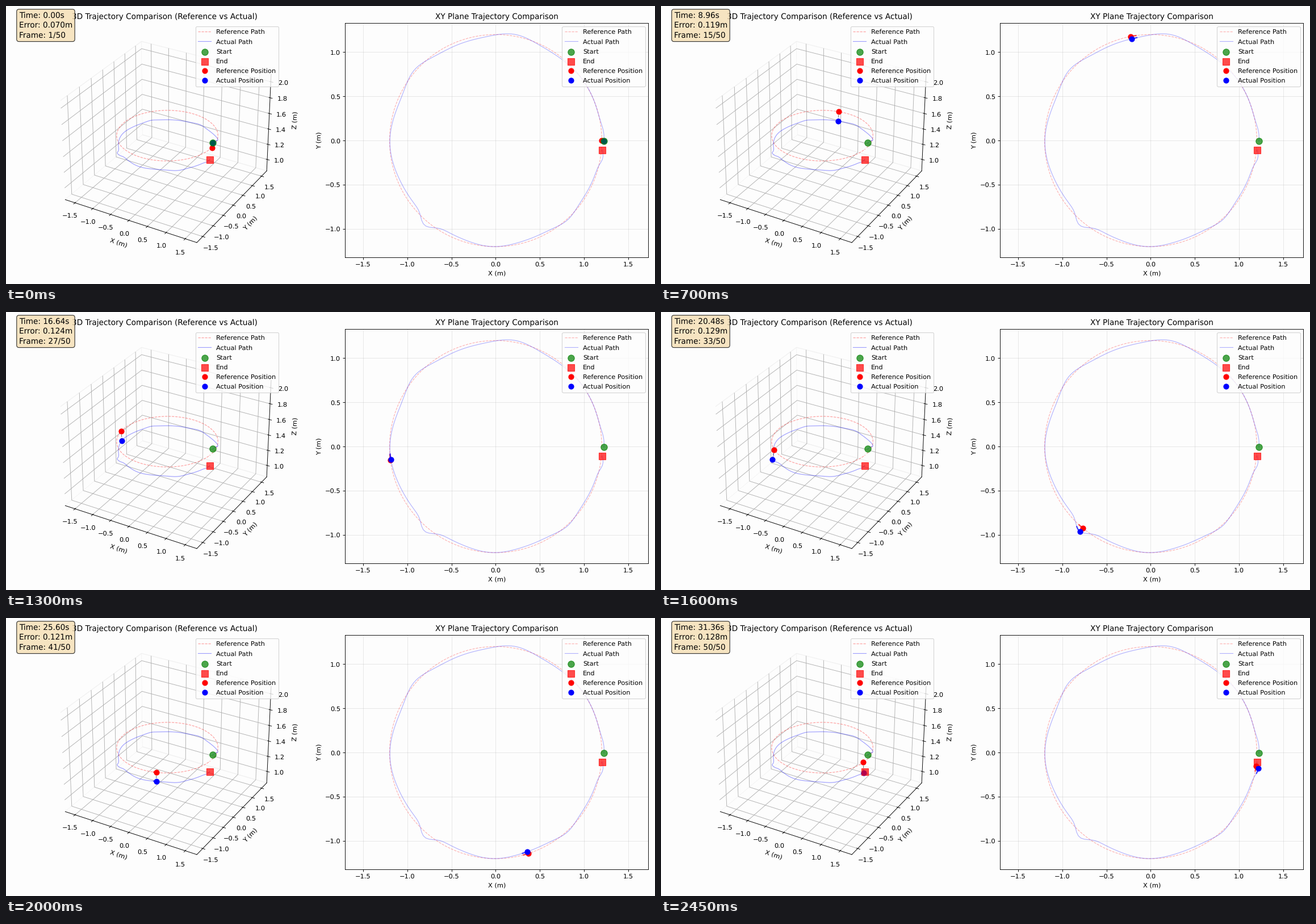
A matplotlib script that plays this animation: 1143x490 px, repeating every 2500 ms.

```python
import numpy as np
import matplotlib.pyplot as plt
from matplotlib.animation import FuncAnimation

W, H = 1143, 490
DPI = H / 6
FRAMES, INTERVAL = 50, 50
STEP = 0.64            # simulated seconds per frame
PERIOD = 32.0          # seconds for one lap
END_TIME = 31.68
TRAIL = 0.25           # seconds of recent motion
RADIUS, HEIGHT = 1.2, 1.5
PAPER = "#fdfdfd"

plt.rcParams.update({
    "font.family": "DejaVu Sans",
    "text.hinting": "none",
    "figure.facecolor": PAPER,
    "axes.facecolor": PAPER,
    "axes.titlepad": 6.6,
    "legend.labelspacing": 0.57,
    "legend.borderpad": 0.42,
})

# Places where the flown path swings outward: angle, height in mm, width
BUMPS = [(3, 28, 5), (32, 18, 14), (80, 50, 9), (139, 55, 8), (182, 35, 13),
         (230, 86, 4), (268, 31, 10), (312, 33, 6), (351, 36, 3)]


def reference(t):
    a = 2 * np.pi * np.asarray(t) / PERIOD
    return np.array([RADIUS * np.cos(a), RADIUS * np.sin(a),
                     HEIGHT + 0 * a])


def radial_error(deg):
    """Cut the corner a little all the way round, with a few outward swings."""
    dev = -38 * np.abs(np.sin(np.radians(deg / 2))) ** 0.6
    for center, height, width in BUMPS:
        dev = dev + height * np.exp(-((deg - center) / width) ** 2 / 2)
    return dev / 1000


def signed_error(deg):
    """Total error: starts too high, then settles below the reference."""
    settled = -np.interp(deg, [151, 230.4, 288, 352.8],
                         [0.119, 0.129, 0.121, 0.128])
    return settled + (0.07 - settled) * np.exp(-(deg / 27.5) ** 1.6)


def actual(t):
    ref = reference(t)
    deg = 360 * np.asarray(t) / PERIOD
    angle = deg - 0.3 - 1.3 * (deg / 360) ** 20
    r = RADIUS + radial_error(angle)
    x, y = r * np.cos(np.radians(angle)), r * np.sin(np.radians(angle))
    err = signed_error(deg)
    flat = np.hypot(x - ref[0], y - ref[1])
    rise = np.sign(err) * np.sqrt(np.maximum(err ** 2 - flat ** 2, 0))
    return np.array([x, y, HEIGHT + rise])


def place(line, pts):
    """Give a 2D or 3D line new points."""
    if hasattr(line, "set_data_3d"):
        line.set_data_3d(*pts)
    else:
        line.set_data(pts[0], pts[1])


def rect(left, top, width, height):
    return [left / W, 1 - (top + height) / H, width / W, height / H]


fig = plt.figure(figsize=((W + 1e-6) / DPI, (H + 1e-6) / DPI), dpi=DPI)
ax3 = fig.add_axes(rect(12.3, 30.5, 534.3, 412.5), projection="3d")
ax2 = fig.add_axes(rect(597, 30.5, 534.4, 412.5))

times = np.linspace(0, END_TIME, 200)
ref_path, act_path = reference(times), actual(times)


def build(ax, dims, alpha):
    """Draw the fixed parts of one view and return its moving lines."""
    ax.plot(*ref_path[:dims], "r--", lw=1, alpha=alpha, label="Reference Path")
    ax.plot(*act_path[:dims], "b-", lw=1, alpha=alpha, label="Actual Path")
    for pt, color, marker, label in ((act_path[:dims, 0], "green", "o", "Start"),
                                     (act_path[:dims, -1], "red", "s", "End")):
        ax.scatter(*[[v] for v in pt], c=color, marker=marker, s=100,
                   alpha=0.7, zorder=3, label=label)
    empty = [[]] * dims
    trails = [ax.plot(*empty, color=c, lw=2, alpha=0.7)[0] for c in "rb"]
    gap = ax.plot(*empty, "k--", lw=1, alpha=0.5)[0] if dims == 3 else None
    dots = [ax.plot(*empty, c + "o", ms=8, label=name + " Position")[0]
            for c, name in (("r", "Reference"), ("b", "Actual"))]
    ax.set_xlabel("X (m)")
    ax.set_ylabel("Y (m)")
    ax.legend(loc="upper right")
    return trails, dots, gap


view3 = build(ax3, 3, 0.38)
view2 = build(ax2, 2, 0.3)

halves = np.arange(-1.5, 1.6, 0.5)
ax3.set_title("3D Trajectory Comparison (Reference vs Actual)")
ax3.set_zlabel("Z (m)")
ax3.set_xticks(halves)
ax3.set_yticks(halves)
ax3.set_zticks(np.arange(1, 2.01, 0.2))
ax3.set_xlim(-1.779, 1.802)
ax3.set_ylim(-1.776, 1.786)
ax3.set_zlim(0.847, 2.093)
for axis in (ax3.xaxis, ax3.yaxis, ax3.zaxis):
    axis.set_pane_color((253 / 255, 253 / 255, 253 / 255, 1))
    axis.pane.set_edgecolor("0.94")

ax2.set_title("XY Plane Trajectory Comparison")
ax2.set_xticks(halves)
ax2.set_yticks(halves[1:-1])
ax2.set_xlim(-1.7044, 1.7268)
ax2.set_ylim(-1.321, 1.327)
ax2.grid(True, alpha=0.3)

info = fig.text(0.02, 0.98, "", fontsize=12, va="top", linespacing=1.38,
                bbox=dict(boxstyle="round,pad=0.3", facecolor="wheat",
                          alpha=0.8))


def update(i):
    t = i * STEP
    recent = np.linspace(max(0, t - TRAIL), t, 8)
    tails = reference(recent), actual(recent)
    for trails, dots, gap in (view3, view2):
        for trail, dot, tail in zip(trails, dots, tails):
            place(trail, tail)
            place(dot, tail[:, -1:])
        if gap is not None:
            place(gap, np.column_stack([tail[:, -1] for tail in tails]))
    error = np.linalg.norm(tails[0][:, -1] - tails[1][:, -1])
    info.set_text(f"Time: {t:.2f}s\nError: {error:.3f}m\n"
                  f"Frame: {i + 1}/{FRAMES}")
    return []


anim = FuncAnimation(fig, update, frames=FRAMES, interval=INTERVAL,
                     init_func=lambda: update(0), repeat=True, repeat_delay=0,
                     blit=False)
plt.show()
```
